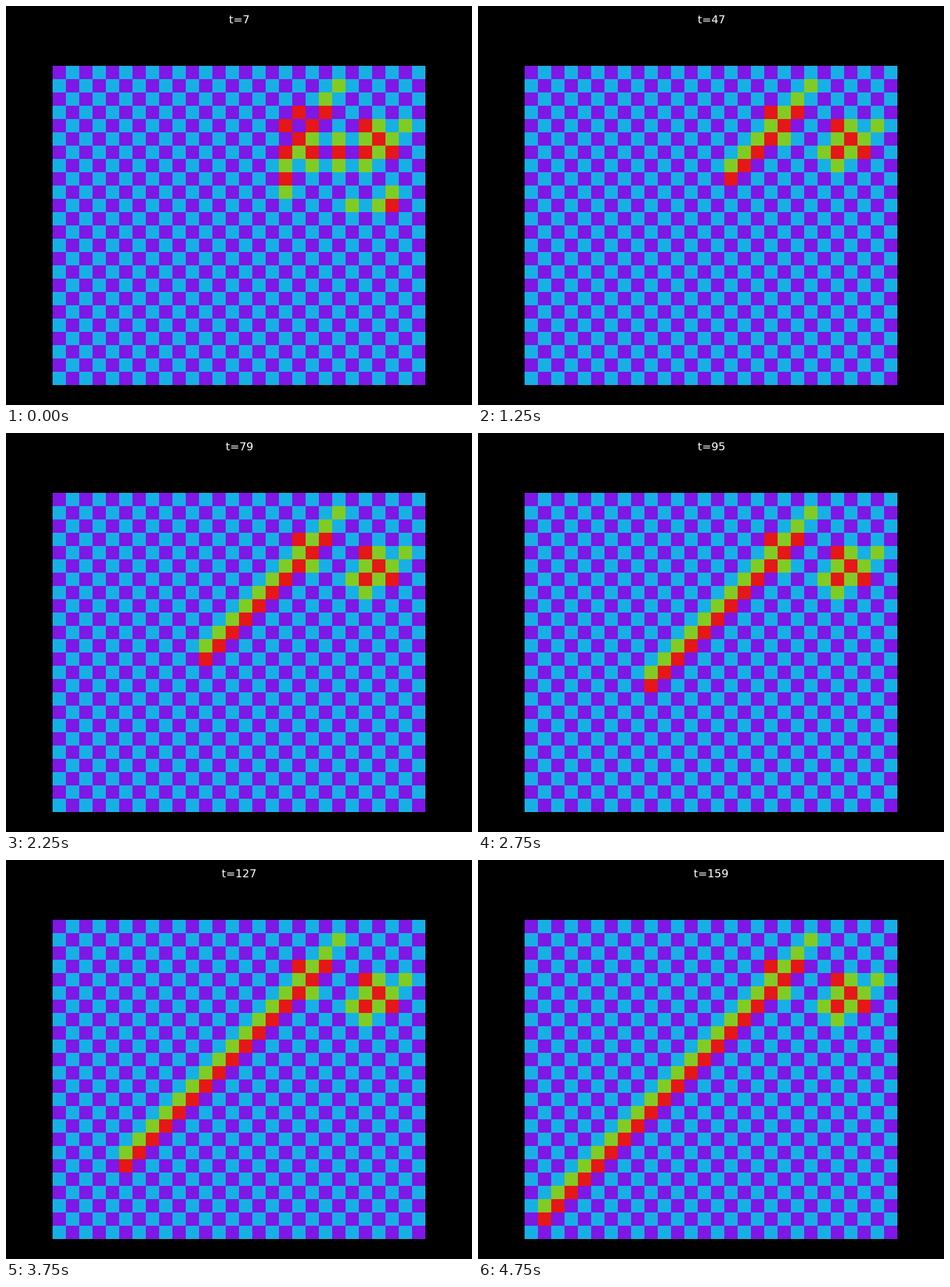
An HTML page with a canvas for the animation above (5 s loop, 700x600 px).

```html
<!DOCTYPE html>
<html>
<head>
<meta charset="utf-8">
<style>
  html, body { margin: 0; width: 100%; height: 100%; overflow: hidden; background: #000; }
  canvas { display: block; }
</style>
</head>
<body>
<canvas id="stage" width="700" height="600"></canvas>
<script>
const ctx = document.getElementById("stage").getContext("2d");
const COLS = 28, ROWS = 24, SIZE = 20, LEFT = 70, TOP = 90;
const STEP_MS = 250, STEPS = 20;

// Colours by parity of column + row
const DEAD = ["#7f17e5", "#17b0e5"];
const ALIVE = ["#80cc24", "#e51717"];

function fillCell(col, row, palette) {
  ctx.fillStyle = palette[(col + row) % 2];
  ctx.fillRect(LEFT + col * SIZE, TOP + row * SIZE, SIZE, SIZE);
}

// A run of live cells, by default heading down and to the left
function run(col, row, count, dCol = -1, dRow = 1) {
  for (let i = 0; i < count; i++) fillCell(col + i * dCol, row + i * dRow, ALIVE);
}

function drawBoard() {
  for (let row = 0; row < ROWS; row++)
    for (let col = 0; col < COLS; col++) fillCell(col, row, DEAD);
}

// Two neighbouring diagonals that gain one cell each per step
function drawStaircase(step) {
  run(21, 1, step + 2);
  run(20, 3, Math.max(4, step + 1));
}

function drawCluster(step) {
  run(23, 4, 1);
  run(24, 4, step < 1 ? 2 : 3);
  run(24, 5, 2);
  run(26, 4, 4);
  run(25, 6, 1);
}

// Runs that shrink away during the first steps
function drawDebris(step) {
  run(18, 3, step < 2 ? 2 : 1);
  run(19, 5, Math.max(1, 3 - Math.ceil(step / 2)));
  run(21, 5, 3 - step, 0, 1);
  run(21, 5, 3 - step, -2, 2);
  if (step < 1) run(25, 9, 2, 0, 1);
  if (step < 2) {
    run(19, 6, 2, -2, 2);
    run(22, 10, 2, 2, 0);
  } else if (step < 4) {
    run(18, 7, 2);
  }
}

function drawTitle(step) {
  const title = "t=" + (7 + 8 * step);
  ctx.fillStyle = "#fff";
  ctx.font = "16.667px 'DejaVu Sans', sans-serif";
  ctx.fillText(title, Math.ceil(350 - ctx.measureText(title).width / 2), 26);
}

function draw(step) {
  ctx.fillStyle = "#000";
  ctx.fillRect(0, 0, 700, 600);
  drawBoard();
  drawDebris(step);
  drawCluster(step);
  drawStaircase(step);
  drawTitle(step);
}

const start = performance.now();
function frame() {
  draw(Math.floor((performance.now() - start) / STEP_MS) % STEPS);
  requestAnimationFrame(frame);
}
frame();
</script>
</body>
</html>
```
